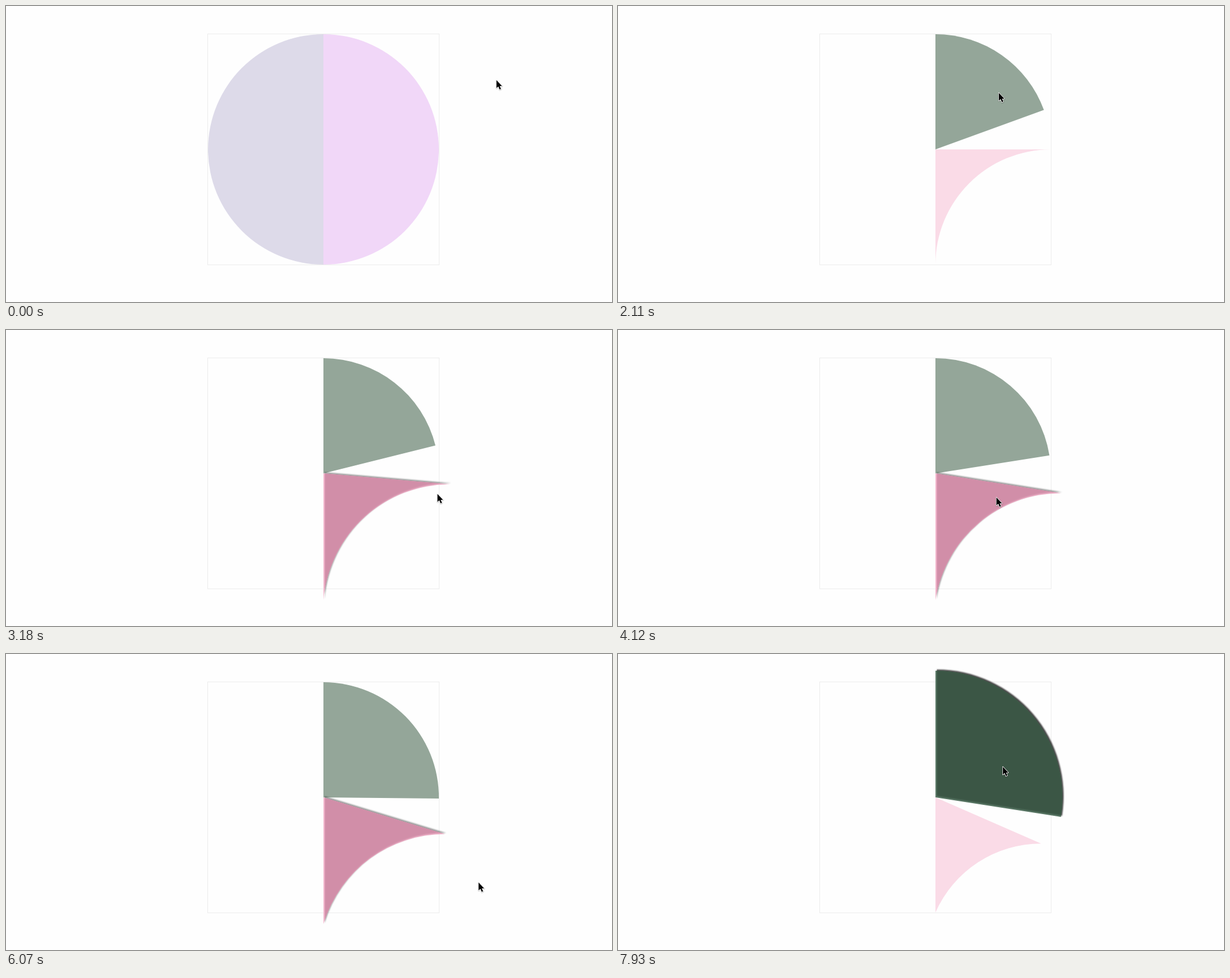
Animation, 1050 px wide and 514 px high, one loop 8000 ms. Source, as an HTML page:

```html
<!DOCTYPE html>
<html lang="en">
<head>
<meta charset="utf-8">
<title>Pie slices</title>
<style>
  html, body { margin: 0; width: 100%; height: 100%; overflow: hidden; background: #fefefe; }
  svg { display: block; width: 1050px; height: 514px; }
</style>
</head>
<body>
<svg viewBox="0 0 1050 514">
  <defs id="defs"></defs>
  <g id="chart">
    <rect x="349.5" y="48.5" width="401" height="401" fill="none" stroke="#ececec"/>
    <g id="halves">
      <path d="M550 49A200 200 0 0 0 550 449Z" fill="#dddae9"/>
      <path d="M550 49A200 200 0 0 1 550 449Z" fill="#f1d7f8"/>
    </g>
    <g id="slices">
      <path id="green"/>
      <path id="pink"/>
    </g>
  </g>
  <g id="cursor" stroke-linejoin="round">
    <path d="M1 1.5V15L4.1 12.3L6.5 17.8L8.9 16.7L6.6 11.5H10.6Z" fill="none" stroke="#000" stroke-opacity=".16" stroke-width="3"/>
    <path d="M.8 .8V14.6L4 11.8L6.3 17.1L8.6 16.1L6.4 11H10.4Z" stroke="#fff" stroke-width="1.6" paint-order="stroke"/>
  </g>
</svg>
<script>
const LOOP = 8000, CX = 550, CY = 249, R = 200;
const CLEAR = 970, REDRAW = 1380;
const MOVE = 180, LAG = 120, FADE = 80;
const $ = id => document.getElementById(id);
const mix = (a, b, k) => a + (b - a) * k;
const smooth = v => { v = Math.max(0, Math.min(1, v)); return v * v * (3 - 2 * v); };
const rgb = (a, b, k) => `rgb(${a.map((v, i) => Math.round(mix(v, b[i], k)))})`;

// Pointer arrivals: time and place. It rests, then hurries to the next place.
const up = [650, 165], down = [600, 290];
const visits = [
  [0, [849, 128]], [170, [824, 146]], [1600, [868, 150]], [2110, [659, 150]],
  [2870, down], [3185, [747, 284]], [3500, [845, 300]], [3750, down],
  [4250, [881, 290]], [4450, up], [4870, [769, 164]], [5080, [829, 180]],
  [5230, up], [5400, down], [6070, [818, 396]], [6330, up],
  [6900, down], [7100, [594, 193]], [7580, [855, 200]], [7800, [666, 195]]
];

function pointer(t) {
  const i = visits.findIndex(v => v[0] > t);
  if (i < 0) return visits[visits.length - 1][1];
  const [start, a] = visits[i - 1], [end, b] = visits[i];
  const move = Math.min(MOVE, end - start);
  const k = smooth((t - end + move) / move);
  return [mix(a[0], b[0], k), mix(a[1], b[1], k)];
}

// What is left of the half turn shrinks steadily
const left = t => 110 * Math.exp(-0.0523 * (t - 2110) / 1000);
const greenEnd = t => 180 - left(t);
const pinkEnd = t => 180 - 0.818 * left(t);

function polar(deg, r) {
  const a = deg * Math.PI / 180;
  return [CX + r * Math.sin(a), CY - r * Math.cos(a)];
}

function wedge(from, to, r) {
  return `M${CX} ${CY}L${polar(from, r)}A${r} ${r} 0 0 1 ${polar(to, r)}Z`;
}

function angleAt(x, y) {
  return (Math.atan2(x - CX, CY - y) * 180 / Math.PI + 360) % 360;
}

const slices = {
  green: {
    rest: [148, 166, 153], rim: [94, 124, 106], core: [59, 86, 69], shade: 0.75,
    path: (t, r) => wedge(0, greenEnd(t), r),
    hit: (t, x, y) => Math.hypot(x - CX, y - CY) < R && angleAt(x, y) < greenEnd(t)
  },
  pink: {
    rest: [250, 219, 231], rim: [243, 184, 206], core: [209, 142, 168], shade: 0.4,
    path: (t, r) => wedge(180, pinkEnd(t), r),
    hit(t, x, y) {
      // The arc bows inwards around this point
      const [px, py] = polar(pinkEnd(t), R), a = angleAt(x, y);
      return a > pinkEnd(t) && a < 180 && x < px && y < CY + R &&
        Math.hypot(x - px, y - py - R) > R;
    }
  }
};

for (const [id, s] of Object.entries(slices)) {
  $('defs').insertAdjacentHTML('beforeend', `
    <filter id="${id}Lift" filterUnits="userSpaceOnUse" x="550" y="0" width="300" height="514" color-interpolation-filters="sRGB">
      <feGaussianBlur in="SourceAlpha" stdDeviation="1"/>
      <feOffset dx="2" dy="-2" result="shade"/>
      <feFlood flood-color="#000" flood-opacity="${s.shade}"/>
      <feComposite in2="shade" operator="in" result="shadow"/>
      <feFlood flood-color="rgb(${s.core})"/>
      <feComposite in2="shade" operator="in"/>
      <feComposite in2="SourceAlpha" operator="in" result="core"/>
      <feMerge><feMergeNode in="shadow"/><feMergeNode in="SourceGraphic"/><feMergeNode in="core"/></feMerge>
    </filter>`);
}

// Share of a short past moment that the pointer spent on the slice
function lift(s, t) {
  const n = 16;
  let hits = 0;
  for (let i = 0; i < n; i++) {
    const past = t - LAG - FADE * i / n;
    if (past > REDRAW && s.hit(past, ...pointer(past))) hits++;
  }
  return smooth(hits / n);
}

function drawSlice(id, t) {
  const s = slices[id], h = lift(s, t), el = $(id);
  el.setAttribute('d', s.path(t, R * (1 + 0.1 * h)));
  el.setAttribute('fill', rgb(s.rest, s.rim, h));
  el.setAttribute('filter', h > 0.1 ? `url(#${id}Lift)` : 'none');
}

function draw(t) {
  const show = (id, on) => { $(id).style.display = on ? '' : 'none'; };
  show('chart', t < CLEAR || t >= REDRAW);
  show('halves', t < CLEAR);
  show('slices', t >= REDRAW);
  drawSlice('green', t);
  drawSlice('pink', t);
  $('cursor').setAttribute('transform', `translate(${pointer(t)})`);
}

const begin = performance.now();
function tick() {
  draw((performance.now() - begin) % LOOP);
  requestAnimationFrame(tick);
}
tick();
</script>
</body>
</html>
```
